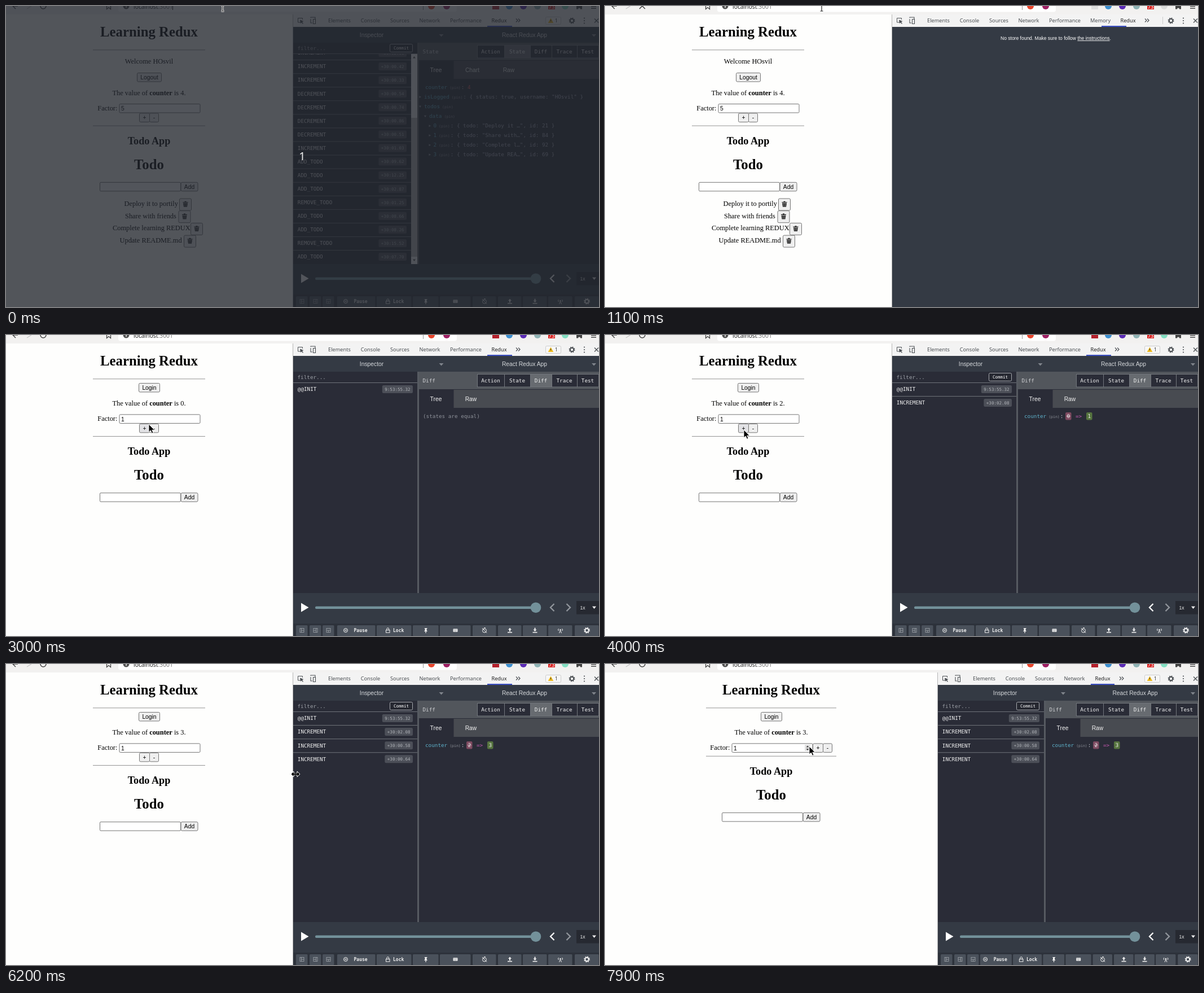
These frames come from a looping animation (1051 px wide and 533 px high, 8000 ms). An HTML page:

```html
<!DOCTYPE html>
<html lang="en">
<head>
<meta charset="utf-8">
<title>Learning Redux</title>
<style>
html, body { margin: 0; width: 100%; height: 100%; overflow: hidden; background: #fefefd; }
svg { display: block; width: 100%; height: 100%; }
text { white-space: pre; }
.serif { font: 12.4px 'Liberation Serif', serif; }
.h1 { font: bold 24.8px 'Liberation Serif', serif; }
.h2 { font: bold 18.2px 'Liberation Serif', serif; }
.sans { font: 10.3px 'Liberation Sans', sans-serif; }
.note { font: 8.52px 'Liberation Sans', sans-serif; }
.ui { font: 9.2px 'Noto Sans', sans-serif; }
.url { font: 10.3px 'Noto Sans', sans-serif; }
.count { font: 20px 'Noto Sans', sans-serif; }
.mono { font: 9.3px 'DejaVu Sans Mono', monospace; }
.tiny { font: 7.5px 'DejaVu Sans Mono', monospace; }
.label { font: bold 8px 'DejaVu Sans Mono', monospace; }
.pin { font-size: 6.5px; }
</style>
</head>
<body>
<svg id="stage" viewBox="0 0 1051 533"></svg>
<script>
const LOOP = 8000, STEP = 100;
const DARK = '#2a2c37', SLATE = '#343a44', CYAN = '#5fb3cc', GREY = '#8e929a';

const rect = (x, y, w, h, fill, more = '') =>
  `<rect x="${x}" y="${y}" width="${w}" height="${h}" fill="${fill}" ${more}/>`;
const text = (x, y, s, font, fill = '#000', anchor = 'start') =>
  `<text x="${x}" y="${y}" class="${font}" fill="${fill}" text-anchor="${anchor}">${s}</text>`;
const mid = (x, y, s, font, fill) => text(x, y, s, font, fill, 'middle');
const line = (d, color, width = 1, more = '') =>
  `<path d="${d}" fill="none" stroke="${color}" stroke-width="${width}" ${more}/>`;
const shape = (d, fill, more = '') => `<path d="${d}" fill="${fill}" ${more}/>`;
const disc = (x, y, r, fill, more = '') => `<circle cx="${x}" cy="${y}" r="${r}" fill="${fill}" ${more}/>`;
const move = (x, y, s) => `<g transform="translate(${x} ${y})">${s}</g>`;

// Latest value of a [time, value] table
const held = (table, t) => table.filter(([start]) => start <= t).pop()[1];

const cursorPath = [
  [0, 'beam', 384, 4], [1900, 'beam', 384, 4], [2000, 'arrow', 376, 20], [2300, 'arrow', 318, 92],
  [2700, 'arrow', 255, 157], [3000, 'arrow', 253, 158], [3200, 'arrow', 253, 158],
  [3500, 'arrow', 246, 168], [5000, 'arrow', 246, 168], [5300, 'arrow', 477, 197],
  [5400, 'arrow', 477, 197], [5900, 'arrow', 504, 190], [6000, 'arrow', 504, 190],
  [6100, 'resize', 513, 195], [6200, 'resize', 513, 195], [6300, 'resize', 532, 193],
  [6400, 'resize', 567, 190], [6500, 'resize', 567, 190], [6600, 'resize', 589, 187],
  [6700, 'resize', 591, 187], [6800, 'resize', 591, 187], [6900, 'arrow', 530, 178],
  [7100, 'arrow', 334, 141], [7200, 'arrow', 334, 141], [7300, 'beam', 340, 148],
  [7600, 'beam', 350, 148], [7700, 'arrow', 357, 146], [7900, 'arrow', 362, 146]
];

function cursor(t) {
  const i = cursorPath.findLastIndex(p => p[0] <= t);
  const [t0, kind, x0, y0] = cursorPath[i];
  const [t1, , x1, y1] = cursorPath[i + 1] || [LOOP, kind, x0, y0];
  const k = (t - t0) / (t1 - t0);
  const art = {
    arrow: shape('M0 0V14L3.3 11 5.6 16.2 8 15.2 5.8 10.2H10.2Z', '#000', 'stroke="#fff" stroke-width=".9"'),
    beam: line('M-2.5 -5H2.5M0 -5V5M-2.5 5H2.5', '#fff', 3) + line('M-2.5 -5H2.5M0 -5V5M-2.5 5H2.5', '#222', 1.2),
    resize: shape('M-8 0L-3 -5V-1.6H3V-5L8 0 3 5V1.6H-3V5Z', '#000', 'stroke="#fff"') +
      line('M-1 -4V4M1.2 -4V4', '#000', .8)
  };
  return move(x0 + (x1 - x0) * k, y0 + (y1 - y0) * k, art[kind]);
}

function gear(x, y, color) {
  return disc(x, y, 3.2, 'none', `stroke="${color}" stroke-width="2"`) +
    disc(x, y, 4.7, 'none', `stroke="${color}" stroke-width="1.5" stroke-dasharray="1.9 1.8"`);
}

function browserBar(t) {
  const loading = t >= 900 && t < 2000, faded = t >= 1100 && t < 1800;
  const ext = [[868, faded ? '#dedede' : '#b3202c'], [892, '#3d8fd0'], [917, '#5b2bb5'], [942, '#8fb3b5'],
    [967, '#d9201f'], [991, faded ? '#dcdcdc' : '#83dfc2']];
  return rect(0, 0, 1051, 15, '#f2f1f0') +
    rect(199, -10, 600, 20.5, '#fff', 'rx="4"') +
    line('M739.5 0V7', '#999') +
    line('M21 0H12L17 5', '#444', 1.4) + line('M37 5L45 0', '#c4c4c4', 1.2) +
    (loading ? line('M61 -5L71 5M71 -5L61 5', '#444', 1.5) : line('M61 0A5 5 0 0 0 71 0', '#444', 1.5)) +
    line('M178.5 0V5.5L182 2.5 185.5 5.5V0', '#444', 1.3) +
    disc(213, 0, 5.5, '#555') + rect(212.4, -1, 1.4, 4, '#fff') +
    text(226, 4.7, 'localhost<tspan fill="#777">:3001</tspan>', 'url', '#222') +
    (t < 700 ? rect(295, 0, 1, 7, '#222') : '') +
    disc(754, 0, 6, '#e8452c') + disc(781, 0, 6, '#9e1f63') +
    ext.map(([x, c]) => x === 868 || x === 967 ? rect(x - 6, -6, 12, 12, c) : disc(x, 0, 6, c)).join('') +
    mid(967, 4.5, '73', 'ui', '#fff') +
    shape('M1011 0H1021V5.5H1018A2 2 0 0 0 1014 5.5H1011Z', '#444') +
    line('M1037 .5H1046M1037 4H1046', '#444', 1.4);
}

function button(x, y, w, h, label, fill = '#efefef') {
  return rect(x, y, w, h, fill, 'rx="2" stroke="#747474"') + mid(x + w / 2, y + h / 2 + 3.7, label, 'sans');
}
const field = (x, y, value = '') =>
  rect(x, y, 143, 15.5, '#fff', 'rx="1.5" stroke="#747474"') + text(x + 3, y + 11.6, value, 'sans');

const todos = [['Deploy it to portily', 209.5, 307.5], ['Share with friends', 211, 306],
  ['Complete learning REDUX', 189, 327.5], ['Update README.md', 201.5, 315.5]];

const bin = line('M-4.5 -3H4.5M-1.5 -4.3H1.5', '#222', 1.3) +
  shape('M-4 -1.6H4L3 5H-3Z', '#333') + line('M-1.4 -1V4M1.4 -1V4', '#aaa', .6);

function page(t, width, count) {
  if (t >= 1200 && t < 1500) return '';
  const logged = t < 1200, wide = width > 560;
  const cx = 253.5 + (width - 509) * 41 / 81, half = 99.5 + (width - 509) * 16 / 81;
  const up = logged ? 0 : -32.6, low = up - (wide ? 16.3 : 0);
  const hr = y => rect(cx - half, y, 2 * half, 1, '#959595');
  const fx = cx - (wide ? 69.5 : 52.5);
  const bx = wide ? fx + 143.5 : cx - 17, by = (wide ? 173.5 : 190) + up;
  const plus = t >= 2800 && t < 5100 ? '#e2e2e5' : '#efefef';
  let s = mid(cx, 54.4, 'Learning Redux', 'h1') + hr(77.3);
  s += logged
    ? mid(cx, 102.4, 'Welcome HOsvil', 'serif') + button(cx - 21, 118.5, 43, 15.5, 'Logout')
    : button(cx - 18, 85.5, 37, 15.5, 'Login');
  s += mid(cx, 157.6 + up, `The value of <tspan font-weight="bold">counter</tspan> is ${count}.`, 'serif') +
    text(fx - 38.7, 185 + up, 'Factor:', 'serif') + field(fx, 173.5 + up, logged ? 5 : 1) +
    button(bx, by, 18, 15.5, '+', plus) + button(bx + 18, by, 16, 15.5, '-') +
    hr(211.6 + low) + mid(cx, 245 + low, 'Todo App', 'h2') + mid(cx, 288.8 + low, 'Todo', 'h1') +
    field(cx - 87, 312.3 + low) + button(cx + 56.5, 312.3 + low, 30, 15.5, 'Add');
  if (t >= 7300) {
    s += rect(354, 143, 10, 11, '#e2e2e2') + shape('M356.5 147.5L359 144.5 361.5 147.5ZM356.5 150L359 153 361.5 150Z', '#444');
  }
  if (logged) {
    todos.forEach(([label, x, b], i) => {
      const y = 341 + i * 21.7;
      s += text(x, y + 13, label, 'serif') + rect(b, y, 21, 21, '#efefef', 'rx="2" stroke="#747474"') + move(b + 10.5, y + 9.7, bin);
    });
  }
  return s;
}

function tabs(t, D) {
  const memory = t >= 1100 && t < 2300, wide = D > 560, off = D - 509;
  const ink = '#4c5054';
  const names = [['Elements', 591], ['Console', 646], ['Sources', 698], ['Network', 751]];
  if (!wide) names.push(['Performance', 815]);
  if (memory) names.push(['Memory', 878]);
  const redux = wide ? 882 - 590 + D : (memory ? 927 : 874) + off;
  const bar = held([[0, 853], [1100, 880], [1200, 898], [1300, 906], [2200, 885], [2300, 862], [2400, 853]], t);
  let s = rect(D, 15, 1051 - D, 22, '#f3f3f3') +
    names.map(([n, x]) => mid(x + off, 29, n, 'ui', ink)).join('') + mid(redux, 29, 'Redux', 'ui', '#222') +
    rect(wide ? redux - 21 : bar + off, 35, wide ? 42 : 44, 2, '#3c50c4') +
    line('M0 0L3 3 0 6M4 0L7 3 4 6', ink, 1.2, `transform="translate(${redux + 30} 22.5)"`) +
    move(D, 0, line('M16 29H8.5V21.5H16.5V24', ink) + shape('M12 24.5L18.5 27 16 28.3 18 31 16.8 31.8 14.8 29 13 31Z', ink) +
      line('M31 21V20H39V23M31 23V30H34M35.5 23.5H39.5V31.5H35.5Z', ink, 1.1)) +
    gear(1003, 26, ink) + [21.5, 26, 30.5].map(y => disc(1025, y, 1.1, ink)).join('') +
    line('M1043 22.5L1050 29.5M1050 22.5L1043 29.5', ink, 1.3);
  s += memory ? line('M988.5 19V32', '#ccc')
    : rect(956.5, 19.5, 27, 13, '#f7f7f7', 'rx="2" stroke="#ccc"') +
      shape('M965.5 21.5L970.3 30H960.7Z', '#edb91f') + rect(965, 24.2, 1, 3, '#333') + mid(975.5, 29.3, '1', 'ui', '#444');
  return s;
}

const pinned = (key, rest) =>
  `<tspan fill="${CYAN}">${key}</tspan><tspan dx="4" class="pin" fill="${GREY}">(pin)</tspan><tspan dx="1">${rest}</tspan>`;

function stateTree() {
  const row = (x, i, s) => text(x, 147 + i * 17.05, s, 'mono', '#b0b4c4');
  const mark = (x, i, open) => move(x, 144 + i * 17.05,
    shape(open ? 'M-2 -1.5H2L0 2Z' : 'M-1.5 -2V2L2 0Z', GREY));
  const items = [['Deploy it …', 21], ['Share with…', 84], ['Complete l…', 92], ['Update REA…', 69]];
  return row(743, 0, pinned('counter', ': <tspan fill="#e0605e">4</tspan>')) +
    mark(734, 1) + row(741, 1, pinned('isLogged', ': { status: true, username: "HOsvil" }')) +
    mark(734, 2, true) + row(741, 2, pinned('todos', '')) +
    mark(743, 3, true) + row(750, 3, pinned('data', '')) +
    items.map(([s, id], i) => mark(751, i + 4) + row(757.5, i + 4, pinned(i, `: { todo: "${s}", id: ${id} }`))).join('');
}

function diffBody(P, n) {
  if (!n) return text(P + 8.5, 147, '(states are equal)', 'mono', GREY);
  return text(P + 12.5, 147, pinned('counter', ':'), 'mono', '#c5c8d0') +
    rect(P + 85.5, 137, 10.5, 13.5, '#7d4a60', 'rx="2"') + mid(P + 90.7, 147, n - 1, 'mono', '#eee') +
    rect(P + 87.5, 143.3, 6.5, .9, '#eee') +
    text(P + 103.5, 147, '=&gt;', 'mono', '#c558b0') +
    rect(P + 122.5, 137, 10.5, 13.5, '#56743f', 'rx="2"') + mid(P + 127.7, 147, n, 'mono', '#eee');
}

function actionRow(D, right, y, name, time, ruled = true) {
  const w = time.length * 4.52 + 9;
  return (ruled ? rect(D, y - 12, right - D, 1, '#70747b') : '') + text(D + 7.8, y + 3.3, name, 'mono', '#f2f2f2') +
    rect(right - 9 - w, y - 7, w, 14, '#4c4f58', 'rx="2.5"') + text(right - 13.5, y + 2.8, time, 'tiny', '#b1b4b9', 'end');
}

const oldActions = '.I.I.I.D.D.D.D.I.A.A.A.R.A.A.R.A'.replaceAll('.', '');
const oldTimes = '02.08 00.42 00.33 00.54 00.74 00.86 00.51 01.03 09.62 12.25 02.87 01.25 08.66 08.26 15.52 07.70'.split(' ');
const actionNames = { I: 'INCREMENT', D: 'DECREMENT', A: 'ADD_TODO', R: 'REMOVE_TODO' };

function actionList(D, P, old, rows) {
  if (old) {
    return [...oldActions].map((a, i) => actionRow(D, 719, 83 + i * 24.07, actionNames[a], '+30:' + oldTimes[i])).join('') +
      rect(718, 84, 11, 373, '#f1f1f1') + rect(718, 198, 11, 246, '#b5b5b5') +
      shape('M721 92.5H726L723.5 89ZM721 448.5H726L723.5 452Z', '#555');
  }
  const times = ['9:53:55.32', '+30:02.08', '+30:00.58', '+30:00.64'];
  return times.slice(0, rows + 1).map((time, i) =>
    actionRow(D, P, 96 + i * 24.1, i ? 'INCREMENT' : '@@INIT', time)).join('');
}

function toolbar(D) {
  const start = D + 77 - (D - 509) * 3 / 81, k = (1051 - start) / 465;
  const X = x => start + (x - 586) * k;
  const w = '#f0f0f0', fill = '#4a515b';
  const slots = [[587, 655], [657, 719], [721, 767], [769, 824], [827, 869], [872, 914], [916, 959], [961, 1004], [1008, 1051]];
  const icons = [
    disc(-19, 0, 3.5, 'none', `stroke="${w}"`) + line('M-20 -1.5V1.5M-18 -1.5V1.5', w) + text(-4.5, 2.8, 'Pause', 'label', w),
    rect(-14.5, -.5, 6.5, 4.5, 'none', `stroke="${w}"`) + line('M-13 -1V-3A1.8 1.8 0 0 1 -9.5 -3V-1', w) + text(-2, 2.8, 'Lock', 'label', w),
    shape('M-2.5 -4H2.5V-3L1.5 -2.5V0L3 2H.6V5H-.6V2H-3L-1.5 0V-2.5Z', w),
    rect(-4, -2.7, 8, 5.5, w, 'rx=".8"') + line('M-3 -1H3M-2 1.2H2', fill, .8, 'stroke-dasharray="1 .7"'),
    disc(0, .5, 3.5, 'none', `stroke="${w}"`) + line('M-4 -4L4 4.5M-1 -4.5H2', w),
    shape('M0 -4.5L3 -1H1V2H-1V-1H-3Z', w) + rect(-4, 2.8, 8, 1.6, w),
    shape('M0 2L3 -1.5H1V-4.5H-1V-1.5H-3Z', w) + rect(-4, 2.8, 8, 1.6, w),
    line('M0 0L-2 5M0 0L2 5M-3 -3Q-5 -1 -3 1M3 -3Q5 -1 3 1', w) + disc(0, -1, 1.2, w),
    gear(0, 0, w)
  ];
  let s = rect(D, 511, 1051 - D, 22, '#2d323b');
  [5, 29, 52].forEach((x, i) => {
    s += rect(D + x, 514, 20.5, 19, fill, 'rx="1.5"') + rect(D + x + 7, 519.5, 7, 7, 'none', 'stroke="#a2a7ad" stroke-width=".8"') +
      line(['M2.5 0V7M2.5 3.5H7', 'M4.5 0V7M0 3.5H4.5', 'M0 3.5H7M3.5 3.5V7'][i], '#a2a7ad', .8, `transform="translate(${D + x + 7} 519.5)"`);
  });
  slots.forEach(([a, b], i) => {
    s += rect(X(a), 514, X(b) - X(a) - .5, 19, fill, 'rx="1.5"') + move((X(a) + X(b)) / 2, 523, icons[i]);
  });
  return s;
}

function reduxPanel(t, D, old, rows) {
  const off = D - 509, P = 730.5 + off * 49 / 81;
  const open = old ? 'State' : 'Diff', ink = '#d5d8db';
  const drop = x => shape(`M${x - 4} 50H${x + 4}L${x} 54.5Z`, '#80858c');
  const heads = [['Action', 835, 48], ['State', 883, 46], ['Diff', 929, 38], ['Trace', 967, 45], ['Test', 1012, 38]];
  const views = old ? [['Tree', 31.5], ['Chart', 96], ['Raw', 160.5]] : [['Tree', 31.5], ['Raw', 93.5]];
  let s = rect(D, 37, 1051 - D, 496, SLATE) + rect(D, 65, 1051 - D, 392, DARK) +
    mid(648 + off * 61 / 81, 55.2, 'Inspector', 'sans', ink) + drop(771.5 + off / 2) +
    mid(919 + off * 20.5 / 81, 55.2, 'React Redux App', 'sans', ink) + drop(1042);
  s += actionList(D, P - .5, old, rows) + rect(D, 65, P - D, 19, DARK) + rect(D, 84, P - D - 1, 1, '#70747b') +
    text(D + 7.5, 77.6, 'filter...', 'mono', '#9da1a7');
  if (old || rows) s += rect(P - 50, 67.5, 40, 14, '#262831', 'rx="2" stroke="#a8abb0"') + mid(P - 30, 77.3, 'Commit', 'tiny', '#fff');
  s += rect(P - 1.5, 65, 3, 392, '#565a61') +
    rect(P + 1.5, 65, 1051 - P, 31, '#52565c') + text(P + 8, 83.6, open, 'mono', '#d0d2d5') +
    heads.map(([n, x, w]) => rect(x + .5, 69.5, w, 22.5, n === open ? '#676b70' : DARK, 'stroke="#73777d"') +
      mid(x + w / 2, 83.7, n, 'mono', '#f2f2f2')).join('') +
    rect(P + 1.5, 97, 1051 - P, 32, '#484b51') + rect(P + 1.5, 97, 61.5, 32, DARK) +
    views.map(([n, x]) => mid(P + x, 116.6, n, 'sans', '#f2f2f2')).join('') +
    (old ? stateTree() : diffBody(P, t < 3800 ? 0 : rows));
  s += move(D, 0, shape('M14 474.5L27.5 482.5 14 490.5Z', '#fff')) +
    rect(D + 39, 480.5, 900 - off - 509 + 0, 4.5, '#73919a', 'rx="2"') +
    disc(939, 482.7, 9.3, '#73919a') +
    line('M971.5 476L965 482.5 971.5 489', old || rows ? '#fff' : '#91969c', 2.3) +
    line('M993.5 476L1000 482.5 993.5 489', '#91969c', 2.3) +
    rect(1011, 471, 40, 23.5, '#262931') + mid(1022, 486, '1x', 'note', '#eee') + shape('M1039 480.5H1046L1042.5 485Z', '#eee');
  return s + toolbar(D);
}

const noStore = D => rect(D, 37, 1051 - D, 496, SLATE) +
  mid(799, 60, 'No store found. Make sure to follow <tspan text-decoration="underline">the instructions</tspan>.', 'note', '#fff');

function scene(t) {
  const D = held([[0, 509], [6300, 529], [6400, 565], [6600, 588], [6700, 590]], t);
  const width = t < 6600 ? 509 : D;
  const count = held([[0, 4], [1200, 0], [3500, 1], [4000, 2], [4700, 3]], t);
  const rows = held([[0, 0], [3700, 1], [4500, 2], [5000, 3]], t);
  const empty = t >= 1100 && t < 2400;
  const dim = held([[0, .78], [100, .4], [200, 0]], t);
  let s = rect(0, 0, 1051, 533, '#fefefd') + page(t, width, count);
  if (t >= 6300 && t < 7500) s += text(D - 5, 29.7, `${Math.round(D / .7753)}px × 673px`, 'url', '#444', 'end');
  s += (empty ? noStore(D) : reduxPanel(t, D, t < 1100, rows)) + tabs(t, D) +
    rect(D - 1, 15, 1, 518, '#b5b5b5') + browserBar(t);
  if (dim) s += rect(0, 0, 1051, 533, '#22262e', `opacity="${dim}"`);
  if (t < 100) s += mid(525, 273, '1', 'count', '#f0f0f0');
  return s + cursor(t);
}

const stage = document.getElementById('stage');
let shown = -1;
function play() {
  const t = Math.floor(performance.now() % LOOP / STEP) * STEP;
  if (t !== shown) stage.innerHTML = scene(shown = t);
  requestAnimationFrame(play);
}
play();
</script>
</body>
</html>
```
